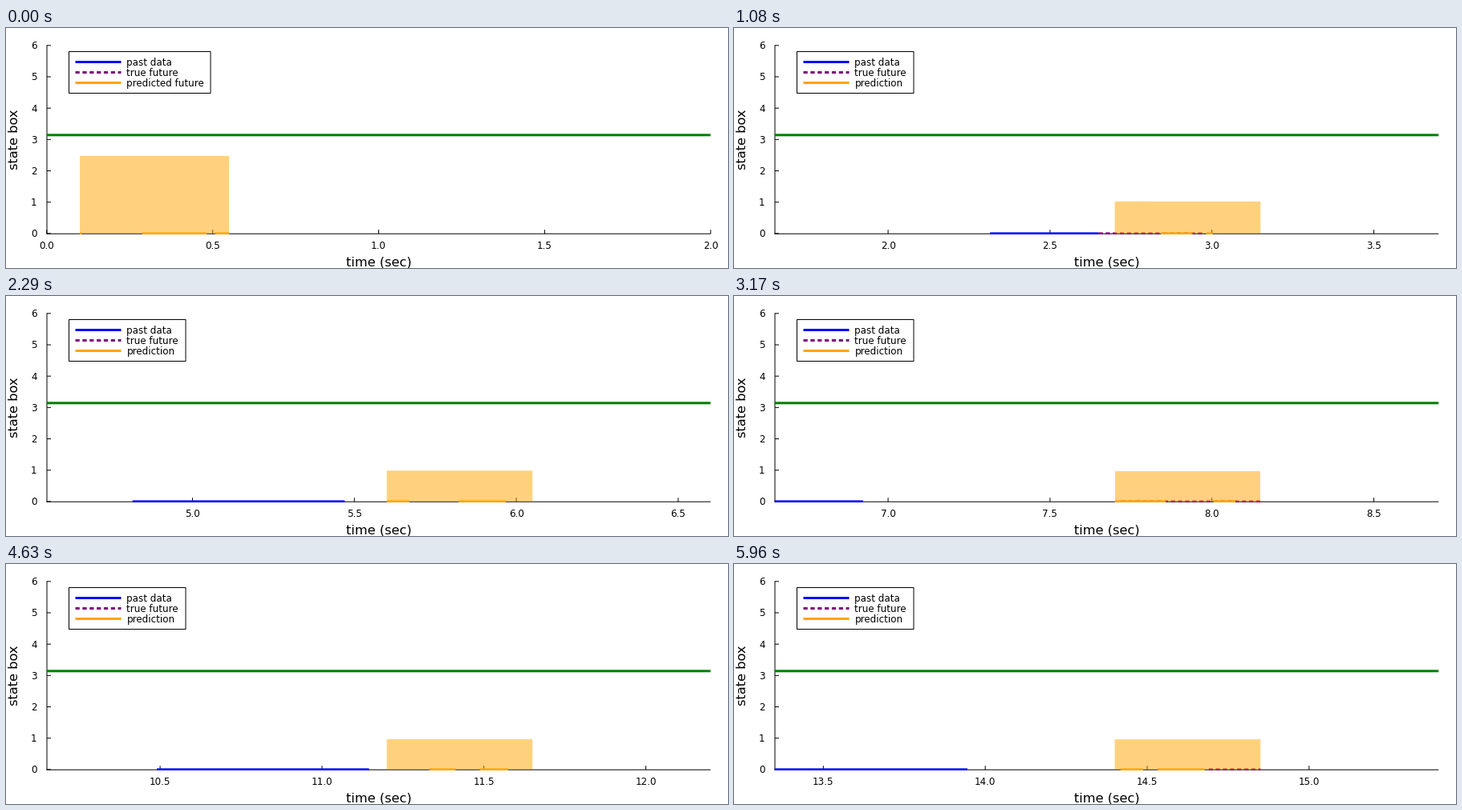
These frames come from a looping animation (900x300 px, 6 s). A matplotlib script:

```python
import numpy as np
import matplotlib.pyplot as plt
from matplotlib.animation import FuncAnimation
from matplotlib.patches import Polygon, Rectangle

W, H, DPI = 900, 300, 100
LOOP_MS = 6000
STEPS = 144
FRAMES = 2 * STEPS + 1  # two per step, the last step held a little longer
LEFT, RIGHT, TOP, BOTTOM = 50.8, 878.3, 21.8, 256.9
PX = 72 / DPI
DASH = (0, (1.75, 1.2))

plt.rcParams["font.family"] = "DejaVu Sans"
fig = plt.figure(figsize=(W / DPI, H / DPI), dpi=DPI, facecolor="white")
ax = fig.add_axes([0, 0, 1, 1])

# The state swings through zero; each positive half lasts equally long
swing_starts = np.interp(range(11), [0, 1, 3, 5, 7, 10],
                         [.95, 2.315, 4.815, 7.72, 10.49, 14.69])
HALF_SWING = .655

# Size of the predicted box: uncertainty shrinks as data comes in
step = np.arange(STEPS)
far_height = .95 + 1.53 / (1 + step / 1.3)
bumps = 3 * step / (step + 10) ** 2 * np.random.default_rng(4).random(STEPS) ** 4
near_height = far_height + bumps


def y_px(v):
    return BOTTOM - v * (BOTTOM - TOP) / 6


def line(xs, ys, color, width=3, **kw):
    kw.setdefault("solid_capstyle", "butt")
    return ax.plot(xs, ys, color=color, lw=width * PX, snap=False, **kw)[0]


def label(x, y, text, size=11.9, **kw):
    kw.setdefault("va", "baseline")
    ax.text(x, y, text, fontsize=size * PX, color="black", **kw)


def mean_runs(i):
    """Parts of the horizon where the noisy mean is above zero."""
    knots = np.linspace(0, .45, 10)
    t = np.linspace(0, .45, 181)
    level = np.random.default_rng(i).uniform(-1.2, .8, knots.size)
    above = np.interp(t, knots, level) > 0
    edges = np.flatnonzero(np.diff(np.r_[False, above, False].astype(int)))
    return [(t[a], t[b - 1]) for a, b in zip(edges[::2], edges[1::2])]


def draw_axes(x_px, lo, hi):
    x0, y0 = 51, 257.2
    line([x0, x0], [TOP - .5, y0 + .5], "black", 1)
    line([x0 - .5, RIGHT], [y0, y0], "black", 1)
    for v in range(7):
        y = y_px(v)
        line([x0, x0 + 5], [y, y], "black", 1)
        label(38.5, y + 4.5, str(v), ha="right")
    for k in range(int(np.ceil(2 * lo - 1e-6)), int(2 * hi + 1e-6) + 1):
        x = x_px(k / 2)
        line([x, x], [y0, y0 - 5], "black", 1)
        label(x, 275.5, f"{k / 2:.1f}", ha="center")
    label(465, 297.6, "time (sec)", 16.3, ha="center")
    label(14.6, 139.5, "state box", 16.3, ha="center", rotation=90,
          rotation_mode="anchor")


def draw_legend(prediction, right):
    ax.add_patch(Rectangle((78.5, 29.5), right - 78.5, 52, fc="white",
                           ec="black", lw=PX, snap=False, zorder=5))
    rows = [("past data", "blue", "-"), ("true future", "purple", DASH),
            (prediction, "orange", "-")]
    for k, (text, color, style) in enumerate(rows):
        y = 42.5 + 13 * k
        line([86.5, 143.5], [y, y], color, ls=style, zorder=6)
        label(150.5, y + 4.4, text, zorder=6)


def draw(frame):
    i = min(frame // 2, STEPS - 1)
    ax.clear()
    ax.set(xlim=(0, W), ylim=(H, 0))
    ax.axis("off")

    start = .1 + .1 * i
    now, end = start - .05, start + .45
    lo, hi = max(0, start - 1.05), max(2, start + 1)

    def x_px(t):
        return LEFT + (t - lo) / (hi - lo) * (RIGHT - LEFT)

    def run(a, b, color, **kw):
        if b > a:
            part = line([x_px(a), x_px(b)], [BOTTOM, BOTTOM], color, **kw)
            part.set_clip_path(Rectangle((50, TOP), 829, 257.7 - TOP,
                                         transform=ax.transData))

    draw_axes(x_px, lo, hi)
    line([LEFT, RIGHT], [y_px(np.pi)] * 2, "green", zorder=3)

    for a in swing_starts:
        b = a + HALF_SWING
        run(max(a, lo), min(b, now), "blue", zorder=3)
        run(max(a, now), min(b, end), "purple", ls=DASH, zorder=3)

    near, far = near_height[i], far_height[i]
    corners = [(0, 0), (0, near), (.05, near), (.1, far), (.45, far), (.45, 0)]
    ax.add_patch(Polygon([(x_px(start + t), y_px(v)) for t, v in corners],
                         fc="orange", alpha=.5, lw=0, zorder=4))
    for a, b in mean_runs(i):
        run(start + a, start + b, "orange", zorder=4.5)

    if i == 0:
        draw_legend("predicted future", 255)
    else:
        draw_legend("prediction", 224)
    return []


anim = FuncAnimation(fig, draw, frames=FRAMES, init_func=lambda: [],
                     interval=LOOP_MS / FRAMES, repeat=True)
plt.show()
```
